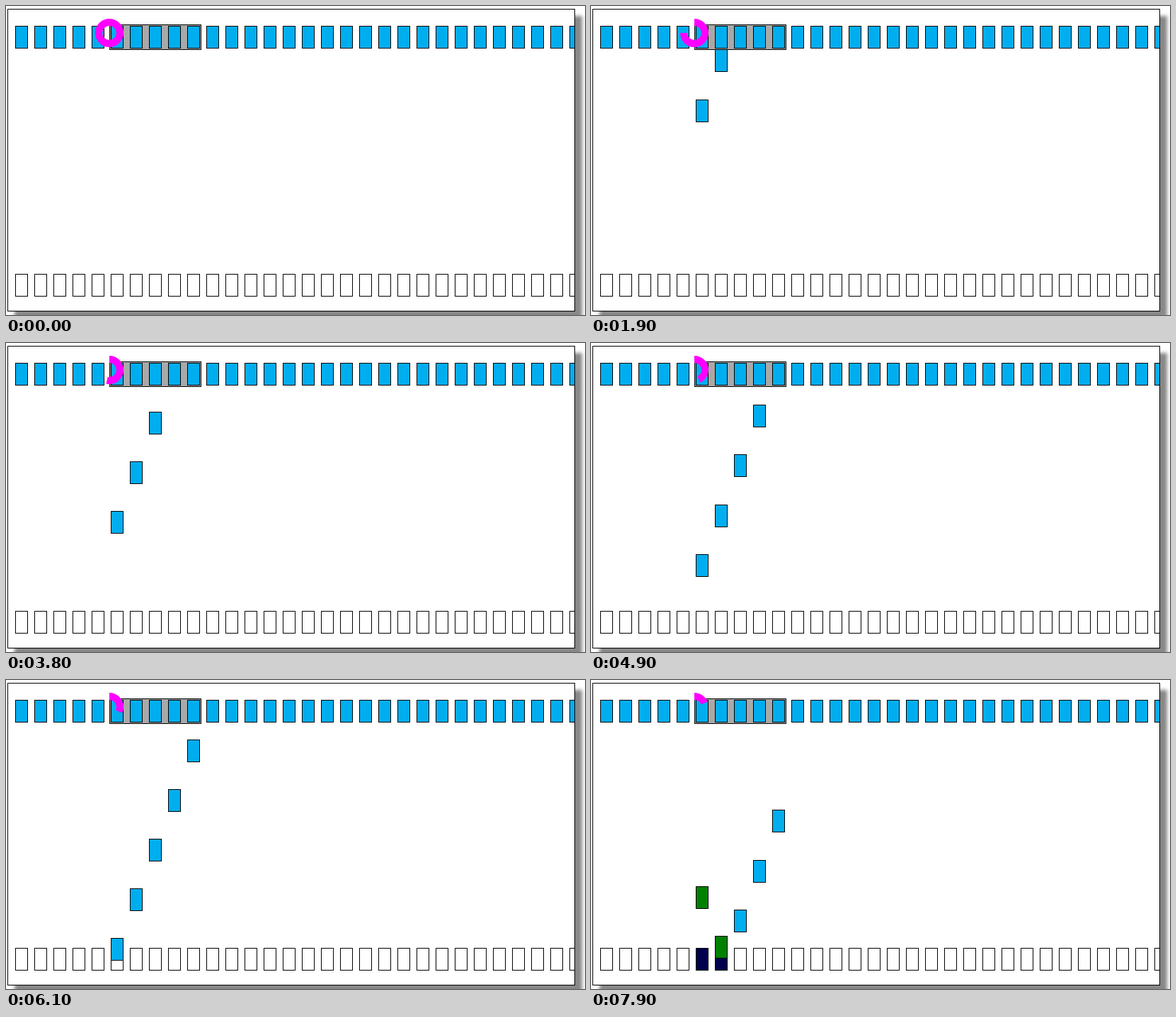
These frames come from a looping animation (818 px wide and 436 px high, 8 s). An HTML page with a canvas:

```html
<!DOCTYPE html>
<html lang="en">
<head>
<meta charset="utf-8">
<title>Sliding window</title>
<style>
  html, body { margin: 0; width: 100%; height: 100%; overflow: hidden; background: #fff; }
  canvas { display: block; }
</style>
</head>
<body>
<canvas id="stage" width="818" height="436"></canvas>
<script>
const ctx = document.getElementById('stage').getContext('2d');

const LOOP = 8000, STEP = 100;
const SLOTS = 30, WINDOW_START = 5, WINDOW_SIZE = 5;
const TOP = 28, BOTTOM = 378;
const SPEED = 55.4, GAP = 70.15;  // pixels per second, pixels between packets
const BLUE = '#00aeef', GREEN = '#008000', NAVY = '#00004d', WHITE = '#fff';

const leadY = s => 26.8 + SPEED * s;
const timerAngle = s => 360 - 50.5 * s + 1.73 * s * s;

function box(x, y, w, h, fill) {
  ctx.fillStyle = '#000';
  ctx.fillRect(x, y, w, h);
  ctx.fillStyle = fill;
  ctx.fillRect(x + 1, y + 1, w - 2, h - 2);
}

const packet = (slot, y, fill) => box(13 + 27 * slot, Math.floor(y), 18, 32, fill);

function drawPanel() {
  ctx.fillStyle = WHITE;
  ctx.fillRect(0, 0, 818, 436);
  ctx.save();
  ctx.shadowColor = '#888';
  ctx.shadowBlur = 5;
  ctx.shadowOffsetX = ctx.shadowOffsetY = 10;
  ctx.fillStyle = '#000';
  ctx.fillRect(2, 4, 802, 427);
  ctx.restore();
  box(2, 4, 802, 427, WHITE);
}

function drawSlots() {
  box(146, 26, 130, 36, '#a9a9a9');
  for (let i = 0; i < SLOTS; i++) {
    packet(i, TOP, BLUE);
    packet(i, BOTTOM, WHITE);
  }
}

function drawPackets(lead) {
  for (let n = 0; n < WINDOW_SIZE; n++) {
    const slot = WINDOW_START + n;
    const y = lead - n * GAP;
    if (y < BOTTOM) {
      packet(slot, Math.max(TOP, y), BLUE);
    } else {
      // delivered: the acknowledgement travels back up
      packet(slot, BOTTOM, NAVY);
      packet(slot, 2 * BOTTOM - y, GREEN);
    }
  }
}

function drawTimer(degrees) {
  const start = -Math.PI / 2;
  ctx.strokeStyle = '#f0f';
  ctx.lineWidth = 10;
  ctx.beginPath();
  ctx.arc(146, 38, 15, start, start + degrees * Math.PI / 180);
  ctx.stroke();
}

function draw(seconds) {
  drawPanel();
  ctx.save();
  ctx.beginPath();
  ctx.rect(3, 5, 800, 425);
  ctx.clip();
  drawSlots();
  drawPackets(leadY(seconds));
  drawTimer(timerAngle(seconds));
  ctx.restore();
}

const begin = performance.now();
function tick() {
  const t = (performance.now() - begin) % LOOP;
  draw(Math.floor(t / STEP) * STEP / 1000);
  requestAnimationFrame(tick);
}
tick();
</script>
</body>
</html>
```
